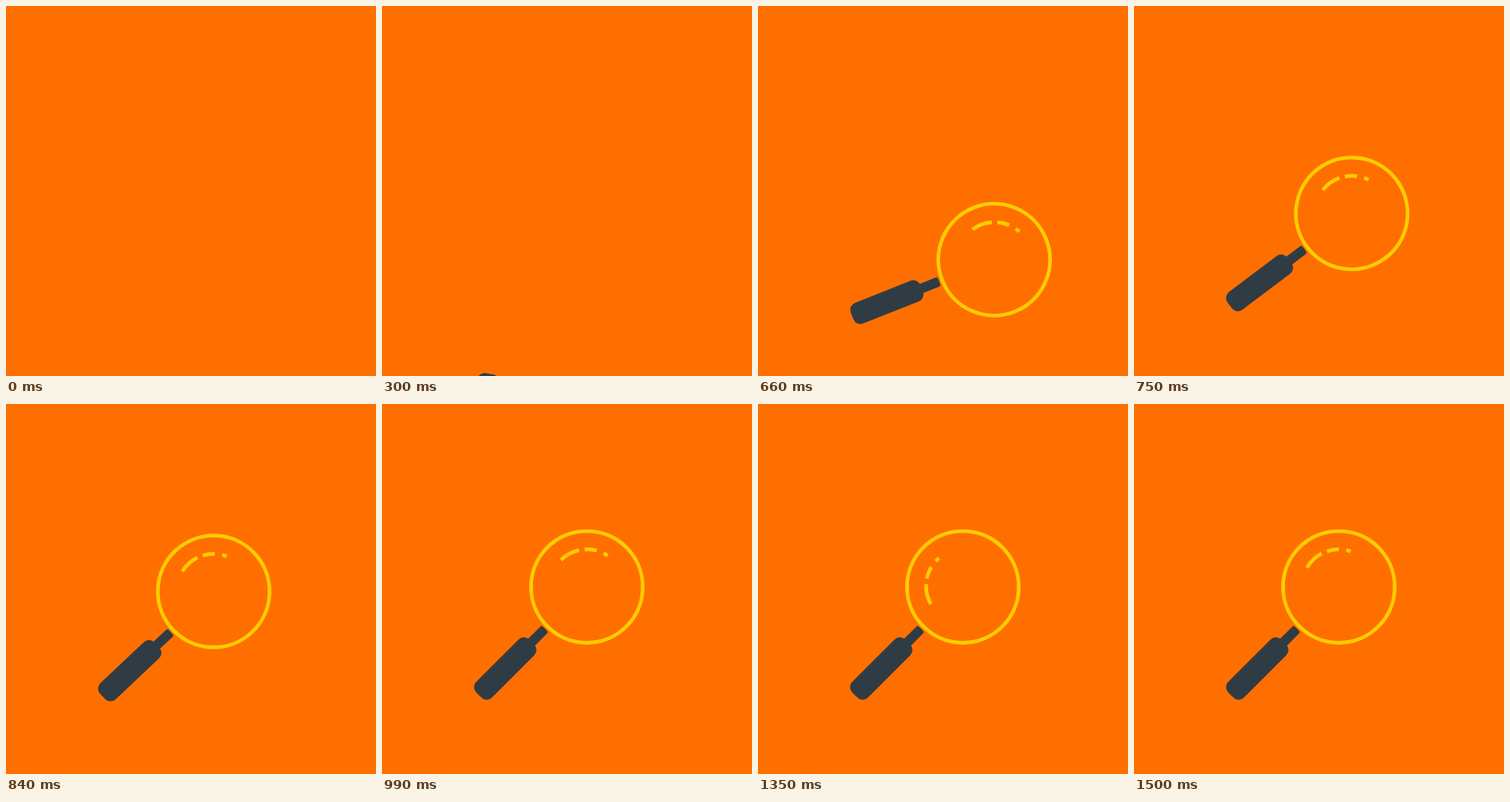
These frames come from a looping animation (500 by 500 pixels, 1.89 s). An HTML page with a canvas:

```html
<!DOCTYPE html>
<html lang="en">
<head>
<meta charset="utf-8">
<title>Magnifier</title>
<style>
  html, body { margin: 0; width: 100%; height: 100%; overflow: hidden; background: #ff6f00; }
  canvas { display: block; width: 500px; height: 500px; }
</style>
</head>
<body>
<canvas id="stage" width="500" height="500"></canvas>
<script>
const ctx = document.getElementById('stage').getContext('2d');
const LOOP = 1890;
const STEP = 30;
const ORANGE = '#ff6f00';
const SLATE = '#303c44';
const YELLOW = '#ffcc00';
const rad = deg => deg * Math.PI / 180;

// Dashes of the lens highlight: start and end angle in degrees
const GLINTS = [[254.8, 287.2], [296, 315], [326.6, 333.9]];

const progress = (t, from, to) => Math.min(1, Math.max(0, (t - from) / (to - from)));
const smooth = p => p * p * (3 - 2 * p);

// Cubic Bezier easing with handles (0.7, 0) and (0.3, 1)
function swing(p) {
  let lo = 0, hi = 1;
  for (let i = 0; i < 24; i++) {
    const s = (lo + hi) / 2, r = 1 - s;
    const x = 2.1 * s * r * r + 0.9 * s * s * r + s ** 3;
    if (x < p) lo = s; else hi = s;
  }
  return smooth((lo + hi) / 2);
}

function bar(x, width, height, radius) {
  ctx.beginPath();
  ctx.roundRect(x, -height / 2, width, height, radius);
  ctx.fill();
}

function arc(x, y, radius, from, to) {
  ctx.beginPath();
  ctx.arc(x, y, radius, rad(from), rad(to));
  ctx.stroke();
}

function draw(t) {
  const rise = smooth(progress(t, 0, 900));
  const tilt = 105 - 150 * swing(progress(t, 165, 930));
  const spin = 360 * smooth(progress(t, 917, 1500));

  ctx.fillStyle = ORANGE;
  ctx.fillRect(0, 0, 500, 500);

  ctx.save();
  // The tool turns around the butt of its handle
  ctx.translate(142.5, 381.5 + 178 * (1 - rise));
  ctx.rotate(rad(tilt));

  ctx.fillStyle = SLATE;
  bar(80, 30, 13, 2.5);
  bar(-16.5, 101, 30, 10);

  ctx.strokeStyle = YELLOW;
  ctx.lineWidth = 5;
  arc(190, 0, 75.5, 0, 360);
  for (const [from, to] of GLINTS) arc(190.8, -0.8, 49.7, from + spin, to + spin);
  ctx.restore();
}

const start = performance.now();
function tick() {
  const t = (performance.now() - start) % LOOP;
  draw(Math.floor(t / STEP) * STEP);
  requestAnimationFrame(tick);
}
tick();
</script>
</body>
</html>
```
